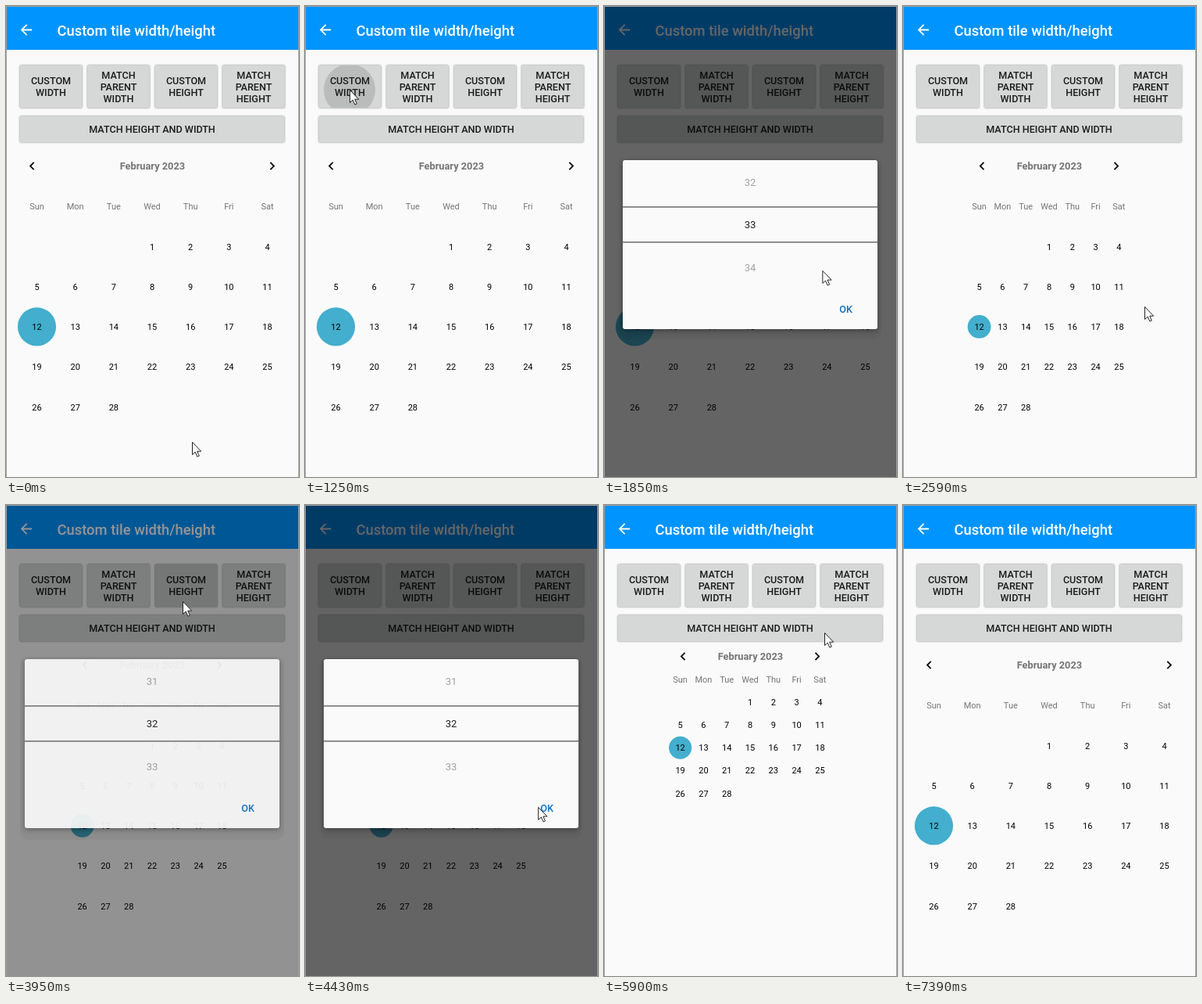
An HTML page for the animation above (8280 ms loop, 375x602 px).

```html
<!DOCTYPE html>
<html lang="en">
<head>
<meta charset="utf-8">
<title>Custom tile width/height</title>
<style>
  html, body { margin: 0; width: 100%; height: 100%; overflow: hidden; background: #fafafa; }
  svg { display: block; }
  text { font-family: Roboto, sans-serif; white-space: pre; }
</style>
</head>
<body>
<svg id="stage" width="375" height="602"></svg>
<script>
const LOOP = 8280, STEP = 120, MOVE = 720, MID = 187;

// The picture advances in steps counted from these moments
const BEATS = [0, 250, 1250, 2590, 2840, 3690, 3830, 4940, 6530, 7270];

// Pointer stops: arrival time, place, bend of the path leading there
const STOPS = [
  { at: 0, to: [238, 557] },
  { at: 850, to: [57, 107], bend: [18, 200] },
  { at: 2210, to: [309, 384], bend: [313, 359] },
  { at: 3440, to: [226, 123], bend: [188, 190] },
  { at: 4690, to: [316, 386], bend: [276, 422] },
  { at: 5900, to: [282, 163], bend: [397, 256] },
  { at: 7390, to: [249, 615], bend: [417, 180] },
];

const CAPTIONS = ['CUSTOM WIDTH', 'MATCH PARENT WIDTH', 'CUSTOM HEIGHT', 'MATCH PARENT HEIGHT'];

const DIALOGS = [
  { open: 1250, close: 2590, gone: 2590, value: 33 },
  { open: 3710, close: 4940, gone: 5180, value: 32 },
];

const stage = document.getElementById('stage');
const clamp = v => Math.max(0, Math.min(1, v));

function quantise(t) {
  const start = BEATS.filter(b => b <= t).pop();
  return start + STEP * Math.floor((t - start) / STEP);
}

function pointerAt(t) {
  const i = Math.max(1, STOPS.findLastIndex(p => t >= p.at - MOVE));
  const { at, to, bend } = STOPS[i];
  const s = 1 - (1 - clamp((t - at) / MOVE + 1)) ** 1.5;
  return STOPS[i - 1].to.map((v, k) =>
    v * (1 - s) ** 2 + 2 * bend[k] * s * (1 - s) + to[k] * s * s);
}

// Text centred on x and (by cap height) on y
function label(str, x, y, size, fill, weight = 400, anchor = 'middle') {
  return `<text x="${x}" y="${y + size * 0.356}" font-size="${size}" fill="${fill}"
    font-weight="${weight}" text-anchor="${anchor}">${str}</text>`;
}

const rect = (x, y, w, h, fill, extra = '') =>
  `<rect x="${x}" y="${y}" width="${w}" height="${h}" fill="${fill}" ${extra}/>`;

function header() {
  return rect(0, 0, 375, 56, '#0094ff') +
    `<path transform="translate(15.2 19.7) scale(.9)" fill="#fff"
      d="M20 11H7.83l5.59-5.59L12 4l-8 8 8 8 1.41-1.41L7.83 13H20z"/>` +
    label('Custom tile width/height', 65.5, 31, 18.4, '#fff', 500, 'start');
}

function button(x, y, w, h, lines, age) {
  let out = rect(x, y, w, h, '#d6d7d7',
    'rx="1.5" style="filter:drop-shadow(0 .3px .9px #0007)"');
  if (age >= 0 && age < 400) {
    const [px, py] = pointerAt(this.now - age);
    out += `<svg x="${x}" y="${y}" width="${w}" height="${h}"><circle cx="${px - x}" cy="${py - y}"
      r="${33 + age * 0.9}" opacity="${0.13 * clamp((400 - age) / 280)}"/></svg>`;
  }
  lines.forEach((s, k) => out += label(s, x + w / 2,
    y + h / 2 + 0.3 + (k - (lines.length - 1) / 2) * 15, 12.6, '#1c1c1c', 500));
  return out;
}

function buttons(t) {
  const make = button.bind({ now: t });
  const taps = [1250, NaN, 3690, NaN];
  return CAPTIONS.map((s, i) =>
    make(17.7 + 86.5 * i, 75.7, 79.6, 54.6, s.split(' '), t - taps[i])).join('') +
    make(17.7, 140.7, 338.6, 33.6, ['MATCH HEIGHT AND WIDTH'], t - 6530);
}

function calendar(t) {
  const narrow = t >= 2590 && t < 6650, short = t >= 4940 && t < 6650;
  const dx = narrow ? 29.8 : 49.17, dy = short ? 29.1 : 51.25;
  const col = c => MID + (c - 3) * dx;
  const row = r => 179.5 + (r + 0.5) * dy;
  const chevron = dir => `<path d="M2.3-4.6L-2.3 0L2.3 4.6" fill="none" stroke="#000" stroke-width="1.8"
    transform="translate(${MID + dir * (3.5 * dx - 18.5)} ${row(0) - 0.6}) scale(${-dir} 1)"/>`;
  let out = chevron(-1) + chevron(1) +
    label('February 2023', MID + 0.4, row(0) - 0.3, 12.8, '#757575', 700) +
    `<circle cx="${col(0)}" cy="${row(4) - 0.2}" r="${Math.min(dx, dy) / 2}" fill="#43aecd"/>`;
  'Sun Mon Tue Wed Thu Fri Sat'.split(' ').forEach((d, c) =>
    out += label(d, col(c), row(1), 11, '#757575'));
  for (let day = 1; day <= 28; day++) {
    const cell = day + 2;
    out += label(day, col(cell % 7), row(2 + Math.floor(cell / 7)), 11, '#000');
  }
  return out;
}

function dialog(t) {
  const box = DIALOGS.find(d => t >= d.open && t < d.gone);
  if (!box) return '';
  const closing = t >= box.close;
  const k = (t - (closing ? box.close : box.open)) / STEP;
  const alpha = closing ? 0.615 * clamp(1 - k / 1.4) : clamp(k * 0.46);
  const scrim = closing ? 0.47 * clamp(1 - k / 1.8) : 0.6 * (1 - Math.cos(Math.PI * clamp(k / 3.2))) / 2;
  const m = closing ? 3 : 4 + 22 * (1 - alpha);
  let out = rect(0, 0, 375, 602, '#000', `opacity="${scrim}"`);
  if (alpha) out += rect(24 - m, 197 - m * 0.45, 326 + 2 * m, 225 + m * 1.45, '#000',
    `rx="${m + 4}" opacity=".045"`);
  out += `<g opacity="${alpha}">` +
    rect(24, 197, 326, 216, '#fafafa', 'rx="3" style="filter:drop-shadow(0 2px 3px #0005)"');
  for (let i = 0; i < 3; i++) {
    out += label(box.value - 1 + i, MID, 225 + 54.5 * i, 13, i === 1 ? '#1c1c1c' : '#a0a0a0');
  }
  return out + rect(24, 256, 326, 1.7, '#7d7d7d') + rect(24, 301, 326, 1.7, '#7d7d7d') +
    label('OK', 309.6, 387.5, 12.6, '#0d6ebd', 500) + '</g>';
}

function pointer(t) {
  if (t >= 7390) return '';
  const [x, y] = pointerAt(t);
  return `<path transform="translate(${x + 0.5} ${y + 0.5})" fill="#fff" stroke="#222"
    d="M0 0V16L3.7 12.6L6.4 18.6L8.8 17.5L6.2 11.7H11.2Z"/>`;
}

function draw(t) {
  stage.innerHTML = rect(0, 0, 375, 602, '#fafafa') + header() + buttons(t) +
    calendar(t) + dialog(t) + pointer(t) +
    '<path d="M.5 602V.5H374.5V602" fill="none" stroke="#a0a0a0"/>';
}

let shown = -1;
function tick() {
  const t = quantise(performance.now() % LOOP);
  if (t !== shown) draw(shown = t);
  requestAnimationFrame(tick);
}
tick();
</script>
</body>
</html>
```
